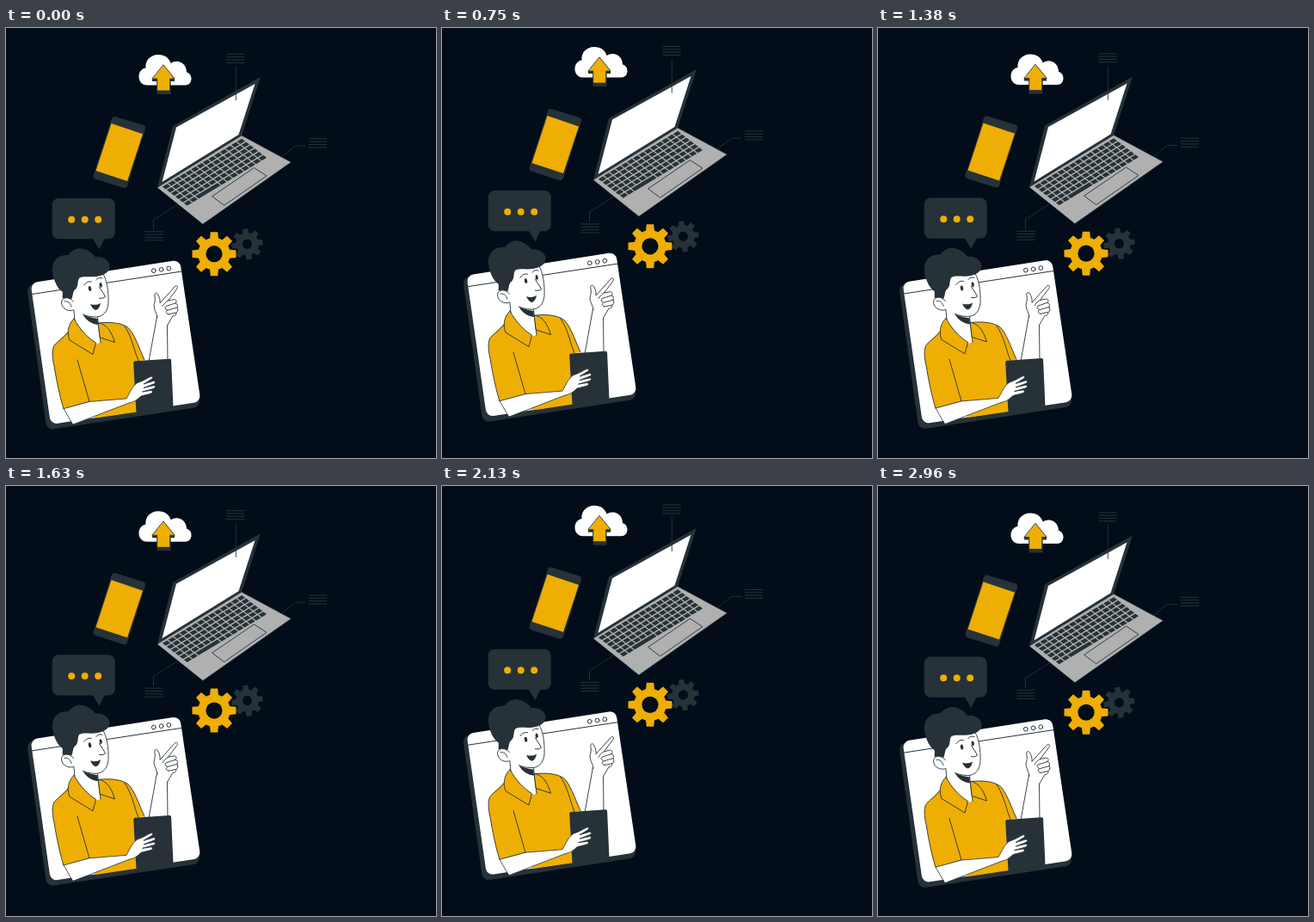
An HTML page with a canvas that plays this animation: 500x500 px, repeating every 3000 ms.

```html
<!DOCTYPE html>
<html lang="en">
<head>
<meta charset="utf-8">
<title>Online support</title>
<style>
html, body { margin: 0; width: 100%; height: 100%; overflow: hidden; background: #020d19; }
canvas { display: block; width: 500px; height: 500px; }
</style>
</head>
<body>
<canvas id="stage" width="500" height="500"></canvas>
<script>
const ctx = document.getElementById('stage').getContext('2d');
const BG = '#020d19', DARK = '#263238', GOLD = '#eeae04', GRAY = '#b0b0b0', WHITE = '#fff';
const LOOP = 3000, FRAMES = 72, BOB = 1500, LIFT = 10, REST = 0.55;

function shape(d, fill, stroke, width = 0.9) {
  const p = new Path2D(d);
  if (fill) { ctx.fillStyle = fill; ctx.fill(p); }
  if (stroke) { ctx.strokeStyle = stroke; ctx.lineWidth = width; ctx.stroke(p); }
}

const line = (d, width) => shape(d, null, DARK, width);

function disc(x, y, r, fill, stroke) {
  ctx.beginPath();
  ctx.arc(x, y, r, 0, Math.PI * 2);
  if (fill) { ctx.fillStyle = fill; ctx.fill(); }
  if (stroke) { ctx.strokeStyle = stroke; ctx.lineWidth = 1; ctx.stroke(); }
}

function oval(x, y, rx, ry, tilt, fill) {
  ctx.beginPath();
  ctx.ellipse(x, y, rx, ry, tilt, 0, Math.PI * 2);
  ctx.fillStyle = fill;
  ctx.fill();
}

// Polygon with rounded corners
function slab(pts, r, fill) {
  const n = pts.length, last = pts[n - 1];
  ctx.beginPath();
  ctx.moveTo((last[0] + pts[0][0]) / 2, (last[1] + pts[0][1]) / 2);
  pts.forEach((p, i) => ctx.arcTo(...p, ...pts[(i + 1) % n], r));
  ctx.closePath();
  ctx.fillStyle = fill;
  ctx.fill();
}

function gear(x, y, outer, root, hole, turn, fill) {
  ctx.save();
  ctx.translate(x, y);
  ctx.rotate(turn);
  disc(0, 0, root, fill);
  const w = outer * 0.2, tip = outer * 0.165;
  for (let i = 0; i < 8; i++) {
    ctx.beginPath();
    ctx.moveTo(-w, -root + 2);
    ctx.lineTo(-tip, -outer);
    ctx.lineTo(tip, -outer);
    ctx.lineTo(w, -root + 2);
    ctx.fill();
    ctx.rotate(Math.PI / 4);
  }
  disc(0, 0, hole, BG);
  ctx.restore();
}

function note(x, y) {
  for (let i = 0; i < 4; i++) line(`M${x} ${y + i * 3.35}h20.5`, 1);
}

function cloud() {
  shape('M164 66.5C158 66.5 154.5 62 154.5 56.5C154.5 51 158 47 162.5 46.5C161.5 38 168 31 177 31C184.5 31 190 35 191.5 41C200 35.5 210 41 210 51.5C213.5 52 215.5 55.5 215.5 59C215.5 63.5 212.5 66.5 208.5 66.5Z', WHITE);
  shape('M175.5 62H170V59H196V62H191.5V77H175.5Z', DARK);
  shape('M183.2 43L196.2 59H190.7V73H175.7V59H170.2Z', GOLD, DARK);
}

function phone() {
  slab([[124, 102], [163, 114], [140, 187], [100.5, 174.5]], 4, DARK);
  shape('M122.5 111L159 123.3L141 178L104.5 166Z', GOLD);
}

function laptop() {
  shape('M176 185.5L194 114L296 57L274 125.5Z', DARK);
  shape('M289.5 65L198 115.5L181.5 179L270.5 124Z', WHITE);
  shape('M176 185.5L274 125L331.5 156L229 228Z', GRAY, DARK, 0.7);
  // Keyboard laid out on a skewed grid
  const at = (u, v) => [181 + 93.5 * u + 30 * v, 184.5 - 56.5 * u + 23 * v];
  const key = (u0, u1, v0, v1) => {
    ctx.beginPath();
    ctx.moveTo(...at(u0, v0));
    ctx.lineTo(...at(u1, v0));
    ctx.lineTo(...at(u1, v1));
    ctx.lineTo(...at(u0, v1));
    ctx.fill();
  };
  ctx.fillStyle = DARK;
  const cols = 14, rows = 6, space = 4;
  for (let r = 0; r < rows; r++) {
    const v0 = (r + 0.08) / rows, v1 = (r + 0.84) / rows;
    for (let c = 0; c < cols; c++) {
      const span = r === rows - 1 && c === 2 ? space : 1;
      key((c + 0.07) / cols, (c + span - 0.1) / cols, v0, v1);
      c += span - 1;
    }
  }
  line('M240 195.5L288.5 162.5L303 172L254 206Z', 0.9);
}

function callouts() {
  note(256.7, 30.3);
  line('M267.3 45V84', 0.9);
  note(352.3, 128.8);
  line('M348 137H336.5L321 149.5', 0.9);
  note(161.8, 236.8);
  line('M171.5 234V223L199 205.5', 0.9);
}

function chat() {
  ctx.beginPath();
  ctx.roundRect(53.7, 198, 73, 47.2, 7.5);
  ctx.fillStyle = DARK;
  ctx.fill();
  shape('M100.5 244L108.3 257.5L115 244Z', DARK);
  for (const x of [76.2, 91.7, 107.2]) disc(x, 222.7, 4, GOLD);
}

function panel() {
  slab([[24, 299], [203, 273], [226, 440.5], [47.5, 467.5]], 8, DARK);
  slab([[28.5, 296.5], [202, 269.5], [226.5, 434.5], [52, 461]], 8, WHITE);
  line('M30.5 309.5L204.5 283', 1);
  for (const [x, y] of [[171.8, 282.2], [180.6, 280.9], [189.3, 279.6]]) disc(x, y, 2.4, WHITE, DARK);
}

function pointer() {
  line('M175.5 335.5L166 388M187.5 345.5L188 388');
  shape('M176 337C176 332 172 328 172 323C172.5 319 174 317 173 312C172 308.5 174.5 306.5 176.5 309.5C178.5 313 179.5 316.5 179 320L196 301C198.5 298.5 200.5 300.5 198.8 303.2L188.5 317L195.5 315.5C198.5 315.5 198.5 318.5 197 320C199.5 320.5 200 323 199 325C200.5 327.5 200 329.5 198 331C198 334 196 335 194 335L187.5 346', WHITE, DARK);
  line('M188.5 317C185 319 183.5 321 182 323.5M197 320L186 323.5C184.5 325 185 327 187 327.5M199 325L187 328.5C185.5 330.5 186.5 332.5 188.5 332.5M198 331L188.5 333');
}

function shirt() {
  shape('M79 343C72 354 63 362 57 368C53 372 53.5 383 56 393C59 412 63 430 67 443L97 434.5L104 453.6L152 446.5L148 388L161 386C154 370 149 355 142 348.5C135 343 122 341.5 108 343Z', GOLD);
  line('M72 354C67 360 61 364 57 368C53 372 53.5 383 56 393C59 412 63 430 67 443L97 434.5M161 386C154 370 149 355 142 348.5C135 343 122 341.5 108 343');
  line('M83 386L97 434.5M138 347C144 355 148 369 151 379L154 387');
}

function head() {
  shape('M78 325L80 341L102 368L110 366L108 342L106 333L90 320Z', WHITE);
  shape('M89.5 333C95 336 101 337 106.5 338L107 345C99 344 93 340 89.5 333Z', DARK);
  line('M79 329L80 340M106.5 336L110 366');
  shape('M76 308C76 299 79 291 86 287L113 284C117.5 294 119.5 306 119 320C118 331 112 336 104 336C95 335.5 85 331 78 325Z', WHITE);
  line('M113 286C117.5 294 119.5 306 119 320C118 331 112 336 104 336C98 336 93 334.5 89.5 333');
  shape('M54 284C52.5 274 58 266 66 264.5C69 264 72 264 73 263.5C77 258 83 255.8 88 256.5C95 257.5 101 262 104 266.5C113 265 121 271 120.5 278C120 284.5 113 288 105 289C97 290 90 288 85.5 290.5C82.5 293 85 301 80 304.5C77 307 78.5 313 75 317L65.5 314C66 310 66 308 65.5 306.5C61 304 55.500 295 54 284Z', DARK);
  shape('M78.5 318C73 311.500 65 313 64.5 319C64.5 326 72 330.5 79 328', WHITE, DARK);
  line('M68 318C72 317 75 320 76 324');
  oval(97.5, 303, 1.7, 3, -0.15, DARK);
  oval(110.2, 298.8, 1.6, 2.9, -0.15, DARK);
  line('M91 299C93 295.5 96 294.5 99.5 295M105 293C107 290.5 109 290 112 291M108.5 301C111 306 114 309 115.5 312.5C113.5 314.5 111 314.5 108.5 314', 1);
  shape('M98 321C102 322.5 106.5 322 110 320C109 325 106.5 328 104 328C101.5 327 99.5 324.5 98 321Z', DARK);
}

function collar() {
  shape('M79 338C74 343 71.5 349 72.5 358L74 363L101 379.5L104.5 366C95 360 86 351 79 338Z', GOLD, DARK);
  shape('M107.5 343C116 344 122 351 126.5 365.5L109.5 360Z', GOLD, DARK);
}

function tablet() {
  slab([[148, 387.5], [192, 384.5], [194.5, 441], [151.5, 447.5]], 2, DARK);
}

function forearm() {
  shape('M67.5 442.5L97 434.5L140 431C144 424 147 416 153 412.5C159 410.5 163 408 168 405.5C171 404.5 171.5 407 169 408.5L160 414L171.5 410.5C174.5 410.5 174 413 171.5 414L160 418.5L171.5 415.8C174.5 416 174 418.5 171 419.5L158.5 423L168.5 421.5C171.5 422 170.5 424.5 168 425.2L157 428C153 432 149 435 143 436L78 461Z', WHITE, DARK, 0.8);
}

function draw(lift) {
  ctx.setTransform(1, 0, 0, 1, 0, 0);
  ctx.fillStyle = BG;
  ctx.fillRect(0, 0, 500, 500);
  ctx.translate(0, REST - lift);
  ctx.lineJoin = ctx.lineCap = 'round';
  cloud();
  phone();
  laptop();
  callouts();
  gear(280.5, 251.3, 18, 13.2, 5.6, -0.13, DARK);
  gear(242, 262.7, 25.5, 18.8, 9.6, 0, GOLD);
  chat();
  panel();
  pointer();
  shirt();
  head();
  collar();
  tablet();
  forearm();
}

// Linear rise and fall, stepped at 24 frames per second
function liftAt(ms) {
  const step = LOOP / FRAMES;
  const t = (Math.floor((ms % LOOP + 5) / step) + 1) * step % BOB;
  return LIFT * (1 - Math.abs(1 - 2 * t / BOB));
}

const start = performance.now();
function tick() {
  draw(liftAt(performance.now() - start));
  requestAnimationFrame(tick);
}
tick();
</script>
</body>
</html>
```
